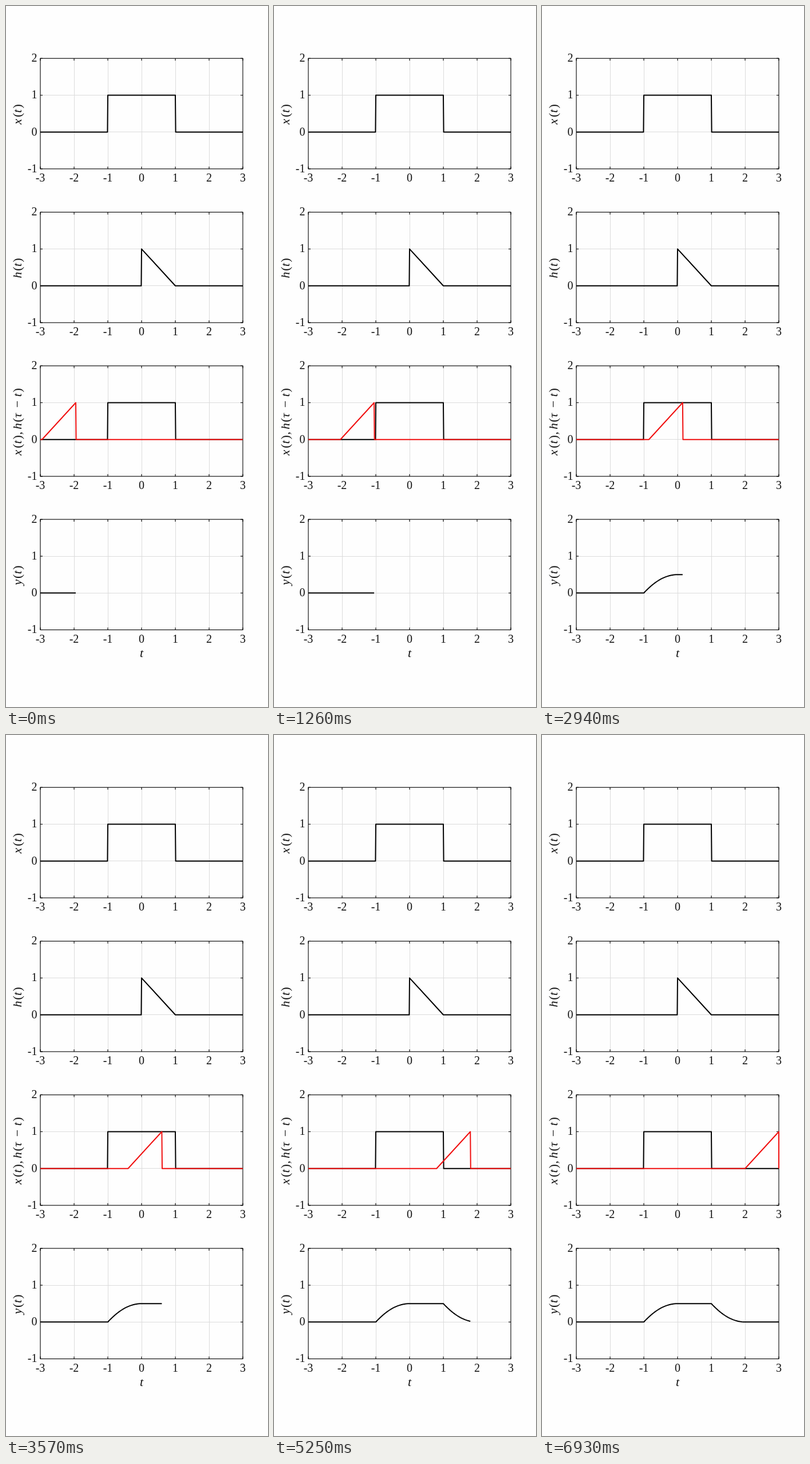
Write an HTML page that moves like this. It is 458x1222 px and loops after 7 s.

```html
<!DOCTYPE html>
<html lang="en">
<head>
<meta charset="utf-8">
<title>Convolution</title>
<style>
html, body { margin: 0; width: 100%; height: 100%; overflow: hidden; background: #fefefe; }
svg { display: block; }
text { font: 20px "Liberation Serif", serif; fill: #111; }
.math { font-size: 22px; }
.it { font-style: italic; }
.grid { stroke: #dcdcdc; stroke-width: 1; }
.axis { stroke: #000; stroke-width: 1.1; fill: none; }
.curve { stroke: #000; stroke-width: 2; fill: none; stroke-linejoin: round; }
.red { stroke: #f01010; }
</style>
</head>
<body>
<svg id="stage" width="458" height="1222" viewBox="0 0 458 1222"></svg>
<script>
const stage = document.getElementById("stage");
const UNIT_X = 59, UNIT_Y = 64.2, MID = 237;
const STEP_MS = 70, STEPS = 100, EDGE = 0.01;
const zeros = [219.7, 487.8, 755.7, 1023.3];

// Advance of each character in a formula
const advance = { x: 12, y: 11, h: 12.1, t: 7.6, "(": 8.2, ")": 8.2, ",": 9.3, "τ": 10.9, "−": 25.7 };
const inset = { "−": 6.6, "(": 0.6 };

const px = t => MID + UNIT_X * t;
const py = (zero, v) => zero - UNIT_Y * v;

function add(tag, attrs, parent = stage) {
  const node = document.createElementNS("http://www.w3.org/2000/svg", tag);
  for (const key in attrs) node.setAttribute(key, attrs[key]);
  parent.appendChild(node);
  return node;
}

function write(str, x, y, anchor, cls = "") {
  add("text", { x, y, "text-anchor": anchor, class: cls }).textContent = str;
}

function formula(str, zero) {
  const chars = [...str];
  const total = chars.reduce((sum, c) => sum + advance[c], 0);
  const group = add("text", {
    class: "math",
    transform: `translate(26.5 ${zero - UNIT_Y / 2 + 0.8}) rotate(-90)`
  });
  let x = -total / 2;
  for (const c of chars) {
    const span = add("tspan", { x: x + (inset[c] || 0), class: /[a-zτ]/.test(c) ? "it" : "" }, group);
    span.textContent = c;
    x += advance[c];
  }
}

function line(x1, y1, x2, y2, cls) {
  add("line", { x1, y1, x2, y2, class: cls });
}

function panel(zero, label) {
  const left = px(-3), right = px(3), top = py(zero, 2), bottom = py(zero, -1);
  for (let t = -2; t <= 2; t++) {
    const x = Math.floor(px(t)) + 0.5;
    line(x, top, x, bottom, "grid");
  }
  for (let v = 0; v <= 1; v++) {
    const y = Math.floor(py(zero, v)) + 0.5;
    line(left, y, right, y, "grid");
  }
  add("rect", { x: left, y: top, width: right - left, height: bottom - top, class: "axis" });
  for (let t = -3; t <= 3; t++) {
    const x = px(t);
    line(x, top, x, top + 4, "axis");
    line(x, bottom, x, bottom - 4, "axis");
    write(t, x, bottom + 22.3, "middle");
  }
  for (let v = -1; v <= 2; v++) {
    const y = py(zero, v);
    line(left, y, left + 4, y, "axis");
    line(right, y, right - 4, y, "axis");
    write(v, 54.5, y + 5.8, "end");
  }
  formula(label, zero);
}

function path(points, zero) {
  return "M" + points.map(([t, v]) =>
    px(Math.max(-3, Math.min(3, t))).toFixed(2) + " " + py(zero, v).toFixed(2)).join("L");
}

function curve(points, zero, cls = "curve") {
  return add("path", { d: path(points, zero), class: cls });
}

const pulse = [[-3, 0], [-1 - EDGE, 0], [-1, 1], [1, 1], [1 + EDGE, 0], [3, 0]];
const ramp = [[-3, 0], [-EDGE, 0], [0, 1], [1, 0], [3, 0]];
const flipped = tau => [[-3, 0], [tau - 1, 0], [tau, 1], [tau + EDGE, 0], [3, 0]];

function area(t) {
  if (t <= -1 || t >= 2) return 0;
  if (t < 0) return (1 - t * t) / 2;
  return t <= 1 ? 0.5 : (2 - t) ** 2 / 2;
}

function response(tau) {
  const points = [[-3, 0]];
  const count = Math.round((tau + 3) / 0.05);
  for (let i = 1; i <= count; i++) {
    const t = -3 + i * 0.05;
    points.push([t, area(t)]);
  }
  return points;
}

["x(t)", "h(t)", "x(t),h(τ−t)", "y(t)"].forEach((label, i) => panel(zeros[i], label));
write("t", MID, 1135, "middle", "math it");

curve(pulse, zeros[0]);
curve(ramp, zeros[1]);
curve(pulse, zeros[2]);
const sliding = curve(flipped(-1.95), zeros[2], "curve red");
const output = curve(response(-1.95), zeros[3]);

function draw(ms) {
  const step = Math.floor(ms / STEP_MS) % STEPS;
  const tau = -1.95 + step * 0.05;
  sliding.setAttribute("d", path(flipped(tau), zeros[2]));
  output.setAttribute("d", path(response(tau), zeros[3]));
}

let start;
function tick(now) {
  if (start === undefined) start = now;
  draw(now - start);
  requestAnimationFrame(tick);
}
draw(0);
requestAnimationFrame(tick);
</script>
</body>
</html>
```
